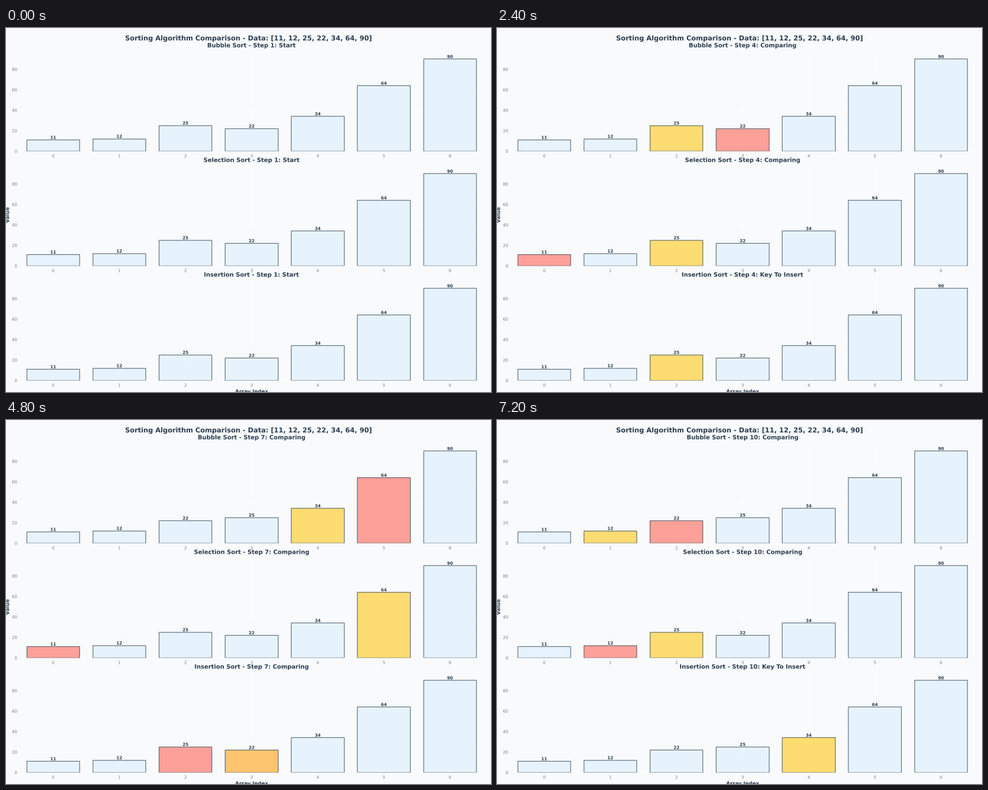
Recreate the animation shown at these times as a matplotlib script. Size 864x648 px, loop 8 s.

```python
from itertools import islice

import matplotlib.pyplot as plt
from matplotlib.animation import FuncAnimation
from matplotlib.lines import Line2D
from matplotlib.patches import PathPatch, Rectangle
from matplotlib.textpath import TextPath
from matplotlib.transforms import Affine2D

DATA = [11, 12, 25, 22, 34, 64, 90]
STEPS, STEP_MS = 10, 800

BACK, INK, TICK = "#F8FAFC", "#2C3E50", "#7F7F7F"
PLAIN, YELLOW, RED = "#E3F2FD", "#FFD54F", "#FF8A80"
ORANGE, PURPLE = "#FFB74D", "#9C27B0"

# Layout units: a 1600 x 1200 canvas, y upwards
WIDTH, HEIGHT = 1600, 1200
LEFT, RIGHT = 46.8, 1573.9
PANEL_H, PANEL_GAP, LOWEST = 334, 378, 38
SLOT = (RIGHT - LEFT) / len(DATA)
UNIT = PANEL_H / (max(DATA) * 1.1)


def bubble_sort(a):
    yield a[:], {}, "Start"
    for end in range(len(a) - 1, 0, -1):
        for j in range(end):
            yield a[:], {j: YELLOW, j + 1: RED}, "Comparing"
            if a[j] > a[j + 1]:
                a[j], a[j + 1] = a[j + 1], a[j]
                yield a[:], {j: PURPLE, j + 1: PURPLE}, "Swapping"


def selection_sort(a):
    yield a[:], {}, "Start"
    for i in range(len(a) - 1):
        low = i
        yield a[:], {i: RED}, "Finding Min"
        for j in range(i + 1, len(a)):
            yield a[:], {low: RED, j: YELLOW}, "Comparing"
            if a[j] < a[low]:
                low = j
        if low != i:
            a[i], a[low] = a[low], a[i]
            yield a[:], {i: PURPLE, low: PURPLE}, "Swapping"


def insertion_sort(a):
    yield a[:], {}, "Start"
    for i in range(1, len(a)):
        key, j = a[i], i - 1
        yield a[:], {i: YELLOW}, "Key To Insert"
        while j >= 0 and a[j] > key:
            yield a[:], {j: RED, j + 1: ORANGE}, "Comparing"
            a[j + 1] = a[j]
            yield a[:], {j: RED, j + 1: ORANGE}, "Moving"
            j -= 1
        a[j + 1] = key
        yield a[:], {j + 1: PURPLE}, "Inserting"


SORTS = [("Bubble", bubble_sort), ("Selection", selection_sort),
         ("Insertion", insertion_sort)]
PANELS = [(name, LOWEST + PANEL_GAP * (2 - k), list(islice(sort(DATA[:]), STEPS)))
          for k, (name, sort) in enumerate(SORTS)]

fig = plt.figure(figsize=(16, 12), dpi=54, facecolor=BACK)
ax = fig.add_axes([0, 0, 1, 1])
ax.set_xlim(0, WIDTH)
ax.set_ylim(0, HEIGHT)
ax.set_axis_off()


def slot_x(i):
    return LEFT + (i + 0.5) * SLOT


def write(x, y, s, points, color=INK, weight="bold", align="center", turn=0):
    path = TextPath((0, 0), s, size=points * 100 / 72,
                    prop={"family": "DejaVu Sans", "weight": weight})
    box = path.get_extents()
    anchor = box.x1 if align == "right" else (box.x0 + box.x1) / 2
    place = Affine2D().translate(-anchor, 0).rotate_deg(turn).translate(x, y)
    return ax.add_patch(PathPatch(place.transform_path(path), fc=color,
                                  ec="none", lw=0, snap=False, zorder=4))


def line(xs, ys, color, width, alpha=1, z=3):
    return ax.add_line(Line2D(xs, ys, color=color, lw=width, alpha=alpha,
                              solid_capstyle="butt", solid_joinstyle="miter",
                              snap=False, zorder=z))


def draw_bar(i, base, value, color):
    x0, x1 = round(slot_x(i - 0.4)), round(slot_x(i + 0.4))
    top = round(base + value * UNIT)
    fill = Rectangle((x0, base), x1 - x0, top - base, fc=color, ec="none",
                     lw=0, alpha=0.8, snap=False, zorder=2)
    # The lower half of the bottom edge is hidden by the panel border
    return [ax.add_patch(fill),
            line([x0, x0, x1, x1], [base, top, top, base], INK, 1.5, 0.8),
            line([x0, x1], [base + 0.5] * 2, INK, 0.75, 0.8),
            write(slot_x(i), base + value * UNIT + 3.3, str(value), 10)]


def draw_frame_parts():
    write(WIDTH / 2, 1159, f"Sorting Algorithm Comparison - Data: {DATA}", 16)
    for _, base, _ in PANELS:
        for i in range(len(DATA)):
            line([slot_x(i)] * 2, [base, base + PANEL_H], "white", 0.8, z=1)
            write(slot_x(i), base - 20.5, str(i), 10, TICK, "normal")
        for v in range(0, 100, 20):
            y = base + v * UNIT
            line([LEFT, RIGHT], [y, y], "white", 0.8, z=1)
            write(LEFT - 10.6, y - 5.3, str(v), 10, TICK, "normal", "right")
    write((LEFT + RIGHT) / 2, -3.7, "Array Index", 12)
    write(10.2, LOWEST + PANEL_GAP + PANEL_H / 2, "Value", 12, turn=90)


live = []


def update(n):
    while live:
        live.pop().remove()
    for name, base, steps in PANELS:
        values, marks, action = steps[n]
        live.append(write((LEFT + RIGHT) / 2, base + PANEL_H + 8.3,
                          f"{name} Sort - Step {n + 1}: {action}", 14))
        for i, value in enumerate(values):
            live.extend(draw_bar(i, base, value, marks.get(i, PLAIN)))
    return live


draw_frame_parts()
anim = FuncAnimation(fig, update, frames=STEPS, interval=STEP_MS,
                     repeat=True, repeat_delay=0)
plt.show()
```
